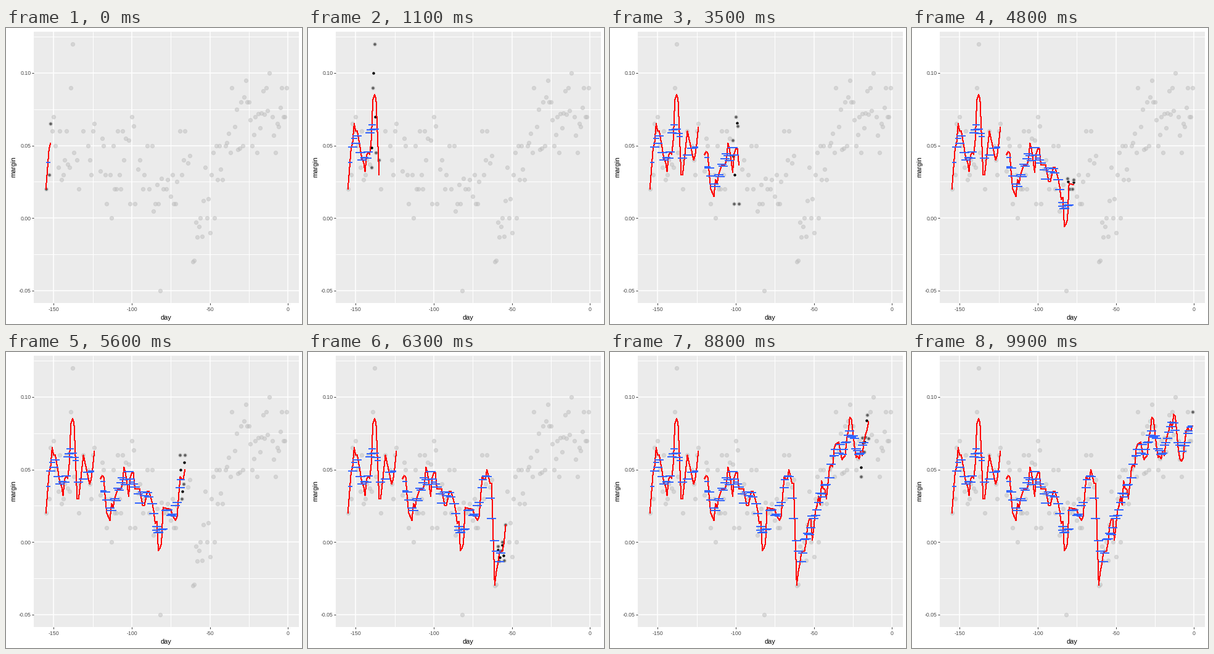
A matplotlib script for the animation above (10 s loop, 480x480 px).

```python
import numpy as np
import matplotlib.pyplot as plt
from matplotlib.animation import FuncAnimation
from matplotlib.collections import LineCollection
from matplotlib.patches import Rectangle

W = H = 480
FRAMES, INTERVAL = 100, 100
PT = 0.72  # points per pixel at 100 dpi
LEFT, RIGHT, TOP, BOTTOM = 45, 474.5, 5.5, 445.5
REACH = 3  # half width of the moving window, in days

# Margins in percent for runs of consecutive days, keyed by first day.
RUNS = {
    -155: [2],
    -153: [3, 6.5, 6, 7, 5],
    -147: [3.5, 6, 2.65, 3, 4, 6, 3.7, 3.5, 9, 12, 4.5],
    -135: [4, 2],
    -131: [6],
    -128: [5, 4, 3, 6, 6.5],
    -120: [3.25, 5.5, 5, 3, 1],
    -114: [3, 0, 5, 2, 2, 6, 3, 2, 6, 4, 5.5],
    -102: [5.35, 1, 7, 6.35, 1],
    -96: [3.35, 4],
    -93: [2, 3],
    -90: [5, 2],
    -87: [5, 0.5, 1, 2.3, 1, -5, 2.75, 2],
    -78: [2, 2.65],
    -75: [1.5, 3, 1, 1, 2.5],
    -69: [6, 3, 4, 6],
    -64: [3.8, 4.3],
    -61: [-3, -2.9, -0.3, -1.3, -0.6, 0, -1.25, 1.2, 3.5, 0,
          1.35, -1, 3, 4.5, 0, 5, 2.65, 5, 3.35, 2.65],
    -40: [5, 5.2, 5.85, 4.5, 9],
    -34: [6.3, 7.5, 4.75, 4.8, 8, 5, 8.35, 9.5, 8, 8, 6.75, 5,
          5.75, 7, 4.5, 7.2, 6.2, 7.25, 8.75, 7.15, 9, 7.4, 10],
    -10: [7, 5.7, 4.5, 6.5, 6.3, 7.6, 9, 7, 7, 9],
}
days = np.array([d + k for d, run in RUNS.items() for k in range(len(run))])
margin = np.array([m for run in RUNS.values() for m in run]) / 100

# Relative places of the extra dots on the path, by number of points.
STEPS = {4: (1/3, 1/2, 3/4), 5: (1/4, 1/3, 2/3), 6: (1/4, 1/3, 2/3, 3/4)}


def px(day):
    return 64.7 + 2.5325 * (np.asarray(day) + 155)


def py(m):
    return 308.3 - 2353 * np.asarray(m)


def local_mean(day, reach):
    return margin[abs(days - day) <= reach].mean()


def smooth_path():
    xs, ys = [], []
    for k, d in enumerate(days):
        if k and d - days[k - 1] > 3:
            xs.append(d - 1)
            ys.append(np.nan)
        xs.append(d)
        ys.append(local_mean(d, 1))
    return np.array(xs), np.array(ys)


def mean_bar(day):
    near = days[abs(days - day) <= REACH]
    y = py(local_mean(day, REACH))
    return [(px(near[0]), y), (px(near[-1]), y)]


def window_dots(k):
    """Points shared with the next window, plus dots on the path between."""
    c = days[k]
    following = days[k + 1] if k + 1 < len(days) else c + REACH
    inside = (days >= following - REACH) & (days <= c + REACH)
    pts = np.column_stack([px(days[inside]), py(margin[inside])])
    if k == 0:
        return pts
    extra = [a + f * (b - a)
             for a, b, f in zip(pts, pts[1:], STEPS.get(len(pts), ()))]
    return np.vstack([pts, *extra])


trend_x, trend_y = smooth_path()
bars = [mean_bar(d) for d in days]

fig = plt.figure(figsize=(W / 100, H / 100), dpi=100, facecolor="white")
ax = fig.add_axes([0, 0, 1, 1])
ax.set(xlim=(0, W), ylim=(H, 0))
ax.axis("off")
ax.add_patch(Rectangle((LEFT, TOP), RIGHT - LEFT, BOTTOM - TOP,
                       fc="#EBEBEB", ec="none", zorder=0))


def rule(xs, ys, color, width, z=1):
    ax.plot(xs, ys, color=color, lw=width * PT, zorder=z,
            solid_capstyle="butt")


def label(x, y, s, size=8.8, color="#4D4D4D", **kw):
    ax.text(x, y, s, fontsize=size * PT, color=color,
            family="Liberation Sans", **kw)


for d in (-125, -75, -25):
    rule([px(d)] * 2, [TOP, BOTTOM], "white", 1)
for m in (-0.025, 0.025, 0.075, 0.125):
    rule([LEFT, RIGHT], [py(m)] * 2, "white", 1)
for d in (-150, -100, -50, 0):
    rule([px(d)] * 2, [TOP, BOTTOM], "white", 1.5)
    rule([px(d)] * 2, [BOTTOM, BOTTOM + 3], "#333333", 1)
    label(px(d), 459, str(d), ha="center", va="baseline")
for m in (-0.05, 0, 0.05, 0.10):
    rule([LEFT, RIGHT], [py(m)] * 2, "white", 1.5)
    rule([LEFT - 3, LEFT], [py(m)] * 2, "#333333", 1)
    label(40.5, py(m) + 3.4, f"{m:.2f}", ha="right", va="baseline")
label(259.5, 473, "day", 11, "black", ha="center", va="baseline")
label(12, 225.5, "margin", 11, "black", ha="center", va="center", rotation=90)

dots = ax.scatter([], [], s=(4.4 * PT) ** 2, c="black", lw=0, zorder=2)
grey = (190 / 255,) * 3 + (0.5,)
ax.scatter(px(days), py(margin), s=(6.2 * PT) ** 2, facecolor=grey,
           edgecolor=grey, lw=1 * PT, zorder=3)
trend, = ax.plot([], [], color="red", lw=1 * PT, zorder=4, antialiased=False)
means = LineCollection([], colors="#3366FF", linewidths=2 * PT, zorder=5,
                       antialiaseds=False, capstyle="butt")
ax.add_collection(means)


def update(i):
    now = round(-155 + 154 * i / (FRAMES - 1))
    k = np.searchsorted(days, now, side="right") - 1
    seen = trend_x <= days[k] + REACH
    trend.set_data(px(trend_x[seen]), py(trend_y[seen]))
    means.set_segments(bars[:k + 1])
    dots.set_offsets(window_dots(k))
    return dots, trend, means


anim = FuncAnimation(fig, update, frames=FRAMES, interval=INTERVAL,
                     repeat=True, repeat_delay=0)
plt.show()
```
